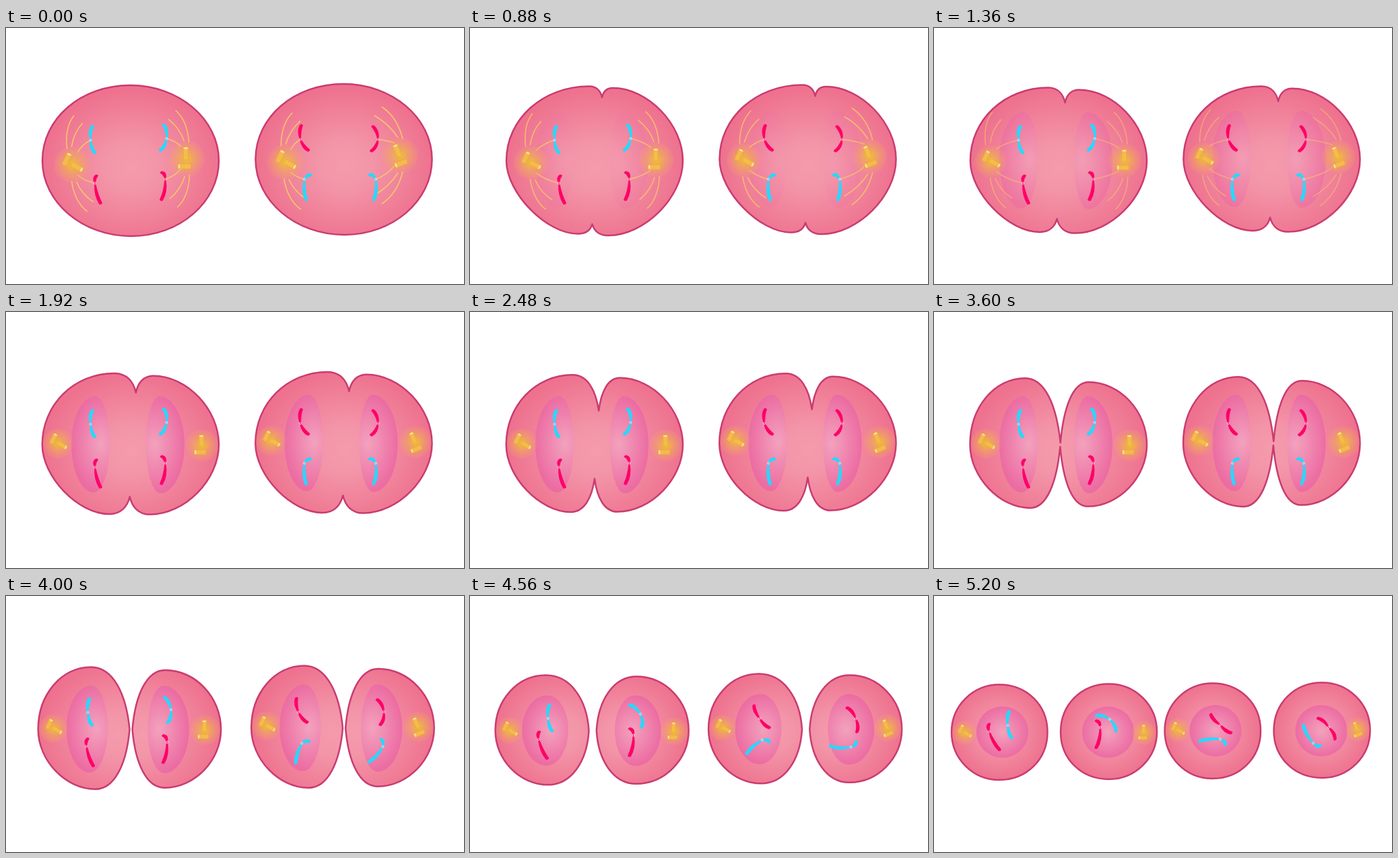
An HTML page with a canvas that plays this animation: 680 by 380 pixels, repeating every 7.44 s.

```html
<!DOCTYPE html>
<html lang="en">
<head>
<meta charset="utf-8">
<title>Cell division</title>
<style>
  html, body { margin: 0; width: 100%; height: 100%; overflow: hidden; background: #fff; }
  canvas { display: block; }
</style>
</head>
<body>
<canvas id="stage" width="680" height="380"></canvas>
<script>
const ctx = document.getElementById('stage').getContext('2d');
const LOOP = 7440, HOLD = 320, STEP = 80;
const SPLIT = 43, LAST = 62;   // steps at which the cells part and come to rest
const SHIFT = [316.5, -2];     // second pair relative to the first
const ROUND = .555;            // handle length that makes a quarter circle
const CYAN = '#27d8ff', RED = '#ff0066';

const clamp = (v, a = 0, b = 1) => Math.min(b, Math.max(a, v));
const mix = (a, b, p) => a + (b - a) * p;
const mixAll = (a, b, p) => a.map((v, i) => mix(v, b[i], p));
const polar = (len, deg) => [len * Math.cos(deg * Math.PI / 180), len * Math.sin(deg * Math.PI / 180)];
const apart = k => clamp((k - SPLIT) / (LAST - SPLIT));

// Interpolates rows of values given at the listed steps
function track(times, rows, k) {
  let i = 0;
  while (i < times.length - 2 && k >= times[i + 1]) i++;
  return mixAll(rows[i], rows[i + 1], clamp((k - times[i]) / (times[i + 1] - times[i])));
}

// Per half: upper notch x, top x, y, side x, y, bottom x, y, lower notch x, upper and lower roundness
const HALF_KEYS = [0, 8, SPLIT, LAST];
const HALVES = [
  [[184.5, 184.5, 85, 54, 197, 186, 309, 186, .56, .55],
   [196, 177, 86.5, 54, 197, 160, 305.5, 181.5, .56, .44],
   [187.5, 134, 98.5, 53.5, 197, 142, 290.5, 187.5, .56, .51],
   [168.5, 97, 131.5, 26, 202, 97, 273, 168.5, .555, .555]],
  [[184.5, 184.5, 85, 316, 197, 186, 309, 186, .55, .55],
   [196, 212, 89, 316, 197, 205, 308, 181.5, .5, .49],
   [187.5, 230, 104.5, 316, 197, 229, 288, 187.5, .54, .53],
   [188, 259.5, 130.5, 331, 201.5, 259.5, 272, 188, .555, .555]]
];
const cleft = k => track([0, 8, 21, 35, SPLIT], [[0], [.16], [.31], [.79], [1]], k)[0];

// Per nucleus: left, right, middle y, top x, y, bottom x, y
const NUCLEI = [
  [[97, 154, 195, 133, 125, 130, 268], [63, 140, 202, 101.5, 164, 101.5, 240]],
  [[208, 265, 197, 228, 125, 229, 269], [220, 297, 202, 258.5, 164, 258.5, 240]]
];

// Per centrosome: x, y, glow radius
const POLE_KEYS = [0, 21, SPLIT, LAST];
const POLES = [
  [[98, 203, 27], [77, 195, 22.5], [77, 195, 22.5], [45, 203, 18]],
  [[268, 194, 27], [291, 198, 24], [291, 198, 24], [312, 203, 18]]
];
// Offset from the pole, turn of the barrels, reach and lean of the spindle; by pair and side
const ASTERS = [
  [{ at: [0, 0], turn: 0, reach: 13, lean: -8 }, { at: [0, 0], turn: 0, reach: 15, lean: -1 }],
  [{ at: [316.5, -4], turn: 0, reach: 17, lean: -5 }, { at: [317, -5], turn: -22, reach: 27, lean: 0 }]
];
// x, y, angle
const BARRELS = [
  [[-7.5, -7.5, -65], [6.5, 3, 29]],
  [[-1, -7, -90], [-2.5, 11, 180]]
];

// Centromere and arm angles at the start and at rest; by pair, side and row
const ARMS = [[22.5, 21.5], [13, 32.5]];
const CHROMOSOMES = [
  [[{ c: [[125.5, 166.5], [109.5, 192]], a: [[-82, 71], [-84, 72]] },
    { c: [[132, 230.5], [82, 201.5]], a: [[-77, 74], [-90, 60]] }],
   [{ c: [[238.5, 164], [261, 183]], a: [[-103, 119], [-165, 63]] },
    { c: [[236.5, 224.5], [247, 195]], a: [[-119, 101], [-122, 102]] }]],
  [[{ c: [[437, 165.5], [425, 191.5]], a: [[-86, 53], [-132, 36]] },
    { c: [[443, 224.5], [425, 212.5]], a: [[-34, 85], [47, 174]] }],
   [{ c: [[552.5, 165.5], [586, 195]], a: [[-112, 121], [-140, 62]] },
    { c: [[549, 224.5], [563, 218.5]], a: [[-146, 96], [18, 242]] }]]
];

// Inner control points of a quarter oval that starts level and ends upright
const quarter = (x, y, sx, sy, q) => [[mix(x, sx, q), y], [sx, mix(sy, y, q)]];

function halfPoints(rows, k) {
  const [ux, tx, ty, sx, sy, bx, by, lx, qt, qb] = track(HALF_KEYS, rows, k);
  const p = apart(k), d = cleft(k), mid = mix(197, 202, p);
  const uy = mix(Math.min(ty, 85 + 20 * p), mid, d), ly = mix(309, mid, d);
  const lean = .11 * (1 - p);
  const inner = (x, y, nx, ny) => {
    const [level, upright] = quarter(x, y, nx, ny, .57);
    return [level, [upright[0] + (x - nx) * lean, upright[1]]];
  };
  return [
    [ux, uy], ...inner(tx, ty, ux, uy).reverse(), [tx, ty],
    ...quarter(tx, ty, sx, sy, qt), [sx, sy],
    ...quarter(bx, by, sx, sy, qb).reverse(), [bx, by],
    ...inner(bx, by, lx, ly), [lx, ly]
  ];
}

function trace(pts) {
  ctx.beginPath();
  ctx.moveTo(...pts[0]);
  for (let i = 1; i + 2 < pts.length; i += 3) {
    ctx.bezierCurveTo(...pts[i], ...pts[i + 1], ...pts[i + 2]);
  }
  ctx.closePath();
}

// Fills the current path with an oval gradient
function fillOval(x, y, rx, ry, stops) {
  const g = ctx.createRadialGradient(0, 0, 0, 0, 0, 1);
  stops.forEach(([at, color]) => g.addColorStop(at, color));
  ctx.save();
  ctx.translate(x, y);
  ctx.scale(rx, ry);
  ctx.fillStyle = g;
  ctx.fill();
  ctx.restore();
}

function body(pts, x, y, rx, ry) {
  trace(pts);
  fillOval(x, y, rx, ry, [[0, '#f49bac'], [.3, '#f395a8'], [1, '#ee718e']]);
  ctx.strokeStyle = '#c93c70';
  ctx.lineWidth = 2.5;
  ctx.lineJoin = 'round';
  ctx.stroke();
}

function cells(k) {
  const halves = HALVES.map(rows => halfPoints(rows, k));
  if (k < SPLIT) {
    body(halves[0].concat(halves[1].reverse().slice(1)), 186, 206, 132, 116);
    return;
  }
  const p = apart(k);
  halves.forEach((pts, side) => {
    body(pts, mix(186, [97, 259.5][side], p), mix(206, 202, p), mix(132, 72, p), mix(116, 72, p));
  });
}

function nucleus(side, k) {
  const p = apart(k);
  const [l, r, cy, tx, ty, bx, by] = mixAll(...NUCLEI[side], p);
  trace([
    [tx, ty], ...quarter(tx, ty, l, cy, ROUND), [l, cy],
    ...quarter(bx, by, l, cy, ROUND).reverse(), [bx, by],
    ...quarter(bx, by, r, cy, ROUND), [r, cy],
    ...quarter(tx, ty, r, cy, ROUND).reverse(), [tx, ty]
  ]);
  // The light spot starts near the inner edge and settles in the middle
  const rx = (r - l) / 2, off = .55 * (1 - p);
  const x = (l + r) / 2 + (side ? -1 : 1) * off * rx;
  ctx.globalAlpha = clamp((k - 5) / 15);
  fillOval(x, cy, rx * (1 + off), (by - ty) / 2, [[0, '#f3a2bd'], [1, '#ec6ca2']]);
  ctx.globalAlpha = 1;
}

function curve(from, ctrl, to) {
  ctx.beginPath();
  ctx.moveTo(...from);
  ctx.quadraticCurveTo(...ctrl, ...to);
  ctx.stroke();
}

// Two arcs above and below the pole, and one thread to each chromosome
function spindle(x, y, side, { reach, lean }, chromosomes, k) {
  const dir = side ? -1 : 1;
  ctx.save();
  ctx.globalAlpha = clamp(1 - (k / 21) ** 2);
  ctx.strokeStyle = '#f7c668';
  ctx.lineWidth = 1.6;
  chromosomes.forEach(({ c: [[cx, cy]] }, row) => {
    const ex = x + 8 * dir, ey = y + (row ? 15 : -18);
    curve([cx, cy], [mix(ex, cx, .35), mix(cy, ey, .35)], [ex, ey]);
  });
  ctx.translate(x, y);
  ctx.rotate(lean * Math.PI / 180);
  for (const v of [-1, 1]) {
    ctx.save();
    ctx.scale(dir, v);
    curve([reach, 72], [reach / 2 - 10, 56], [-4, 24]);
    curve([reach + 11, 59], [reach / 2 + 2, 46], [3, 26]);
    ctx.restore();
  }
  ctx.restore();
}

function barrel(x, y, angle) {
  ctx.save();
  ctx.translate(x, y);
  ctx.rotate(angle * Math.PI / 180);
  ctx.beginPath();
  ctx.moveTo(8, -3.6);
  ctx.lineTo(-8, -3.6);
  ctx.quadraticCurveTo(-10, 0, -8, 3.6);
  ctx.lineTo(8, 3.6);
  ctx.closePath();
  ctx.fillStyle = 'rgba(245,190,72,.9)';
  ctx.strokeStyle = '#e6ab3c';
  ctx.lineWidth = .7;
  ctx.fill();
  ctx.stroke();
  ctx.beginPath();
  ctx.ellipse(8, 0, 1.9, 3.6, 0, 0, 7);
  ctx.fillStyle = '#fbe48c';
  ctx.fill();
  ctx.stroke();
  ctx.restore();
}

function centrosome(x, y, r, side, turn) {
  ctx.save();
  ctx.translate(x, y);
  ctx.beginPath();
  ctx.arc(0, 0, r, 0, 7);
  fillOval(0, 0, r, r, [
    [0, 'rgba(238,198,36,.95)'], [.4, 'rgba(239,182,70,.62)'], [1, 'rgba(244,165,100,.13)']
  ]);
  ctx.rotate(turn * Math.PI / 180);
  ctx.scale(r / 26, r / 26);
  BARRELS[side].forEach(b => barrel(...b));
  ctx.restore();
}

function arm(angle, len, bend) {
  const w = 3.3;
  ctx.save();
  ctx.rotate(angle * Math.PI / 180);
  ctx.beginPath();
  ctx.moveTo(0, -1.1);
  ctx.quadraticCurveTo(len * .55, 2 * bend - w, len - 1, -w * .75);
  ctx.quadraticCurveTo(len + 1.6, 0, len - 1, w * .75);
  ctx.quadraticCurveTo(len * .55, 2 * bend + w, 0, 1.1);
  ctx.closePath();
  ctx.fill();
  ctx.restore();
}

// Drifts and turns about the point midway between the two tips
function chromosome({ c, a }, pair, side, row, k) {
  const lens = ARMS[row];
  const p = clamp((k - SPLIT + 1) / (LAST - SPLIT + 1));
  const middle = angles => {
    const [u, v] = angles.map((deg, i) => polar(lens[i], deg));
    return mixAll(u, v, .5);
  };
  const angles = mixAll(...a, p);
  const drift = mixAll(...c, p), swing = mixAll(middle(a[0]), middle(a[1]), p);
  const now = middle(angles);
  ctx.save();
  ctx.translate(drift[0] + swing[0] - now[0], drift[1] + swing[1] - now[1]);
  ctx.fillStyle = pair === row ? CYAN : RED;
  const bend = side ? 2.2 : -1.7;
  arm(angles[0], lens[0], bend);
  arm(angles[1], lens[1], -bend);
  ctx.beginPath();
  ctx.arc(0, 0, 1.5, 0, 7);
  ctx.strokeStyle = 'rgba(255,255,255,.85)';
  ctx.lineWidth = .8;
  ctx.stroke();
  ctx.restore();
}

function draw(k) {
  ctx.fillStyle = '#fff';
  ctx.fillRect(0, 0, 680, 380);
  for (const pair of [0, 1]) {
    ctx.save();
    ctx.translate(SHIFT[0] * pair, SHIFT[1] * pair);
    cells(k);
    nucleus(0, k);
    nucleus(1, k);
    ctx.restore();
    for (const side of [0, 1]) {
      const aster = ASTERS[pair][side], chromosomes = CHROMOSOMES[pair][side];
      const [px, py, r] = track(POLE_KEYS, POLES[side], k);
      const x = px + aster.at[0], y = py + aster.at[1];
      spindle(x, y, side, aster, chromosomes, k);
      centrosome(x, y, r, side, aster.turn);
      chromosomes.forEach((c, row) => chromosome(c, pair, side, row, k));
    }
  }
}

const start = performance.now();
function tick() {
  const t = (performance.now() - start) % LOOP;
  draw(clamp(Math.floor((t - HOLD) / STEP) + 1, 0, LAST));
  requestAnimationFrame(tick);
}
tick();
</script>
</body>
</html>
```
